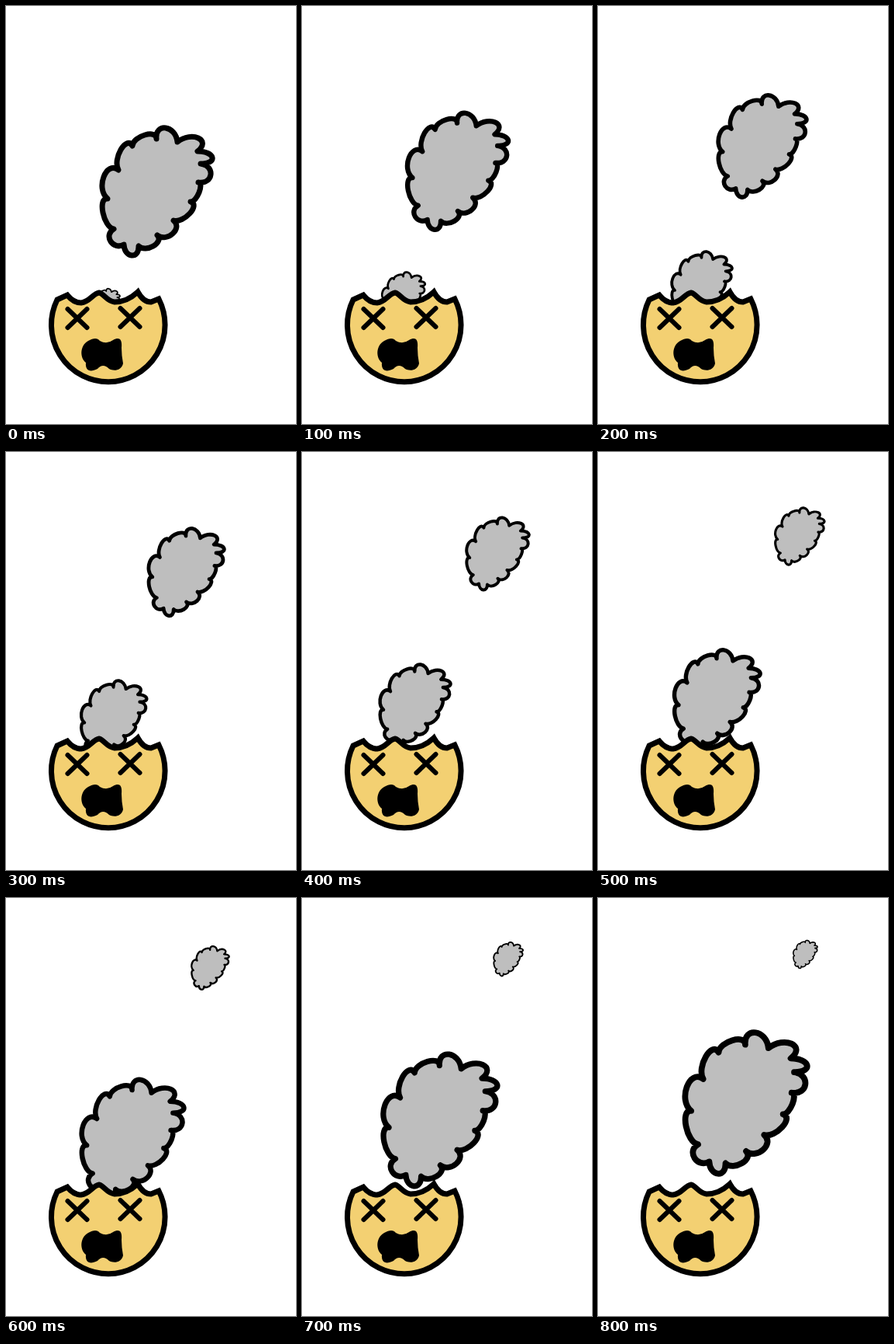
Recreate the animation shown at these times as an HTML page. Size 374x538 px, loop 0.9 s.

```html
<!DOCTYPE html>
<html lang="en">
<head>
<meta charset="utf-8">
<title>Smoking head</title>
<style>
  html, body { margin: 0; width: 100%; height: 100%; overflow: hidden; background: #fff; }
  svg { display: block; width: 100%; height: 100%; }
</style>
</head>
<body>
<svg viewBox="0 0 374 538" stroke="#000" stroke-linecap="round">
  <defs>
    <path id="puff" fill="#bebebe" stroke-width="7" stroke-linejoin="round" transform="translate(-195 -239)"/>
    <path id="eye" fill="none" stroke-width="6" d="M-12.5 -12L12.5 12M12.5 -12L-12.5 12"/>
  </defs>
  <use class="cloud" href="#puff"/>
  <use class="cloud" href="#puff"/>
  <path fill="#f3d072" stroke-width="7"
    d="M66 378L79 372Q87 382 97 382C108 381 112 370 120 369C126 370 130 380 140 381Q156 381 170 368Q177 381 187 381L197 377
       A73.3 73.3 0 1 1 66 378Z"/>
  <use href="#eye" x="92" y="402"/>
  <use href="#eye" x="160" y="401"/>
  <path stroke="none"
    d="M106 431C113 427 118 427 121 431Q130 436 138 430C147 425 150 430 149 440Q149 450 151 460
       C149 470 138 470 133 467Q125 459 118 467C108 472 102 469 103 459C95 453 95 437 106 431Z"/>
</svg>
<script>
const STEP = 100, STEPS = 9;

// Outline of the puff: notches, each followed by the tip of the bump after it.
const notches = [
  [194, 171, 206, 157], [221, 175, 248, 170], [247, 187, 266, 195], [251, 203, 264, 217], [248, 227, 249, 240],
  [238, 252, 237, 267], [216, 276, 215, 293], [195, 295, 190, 309], [171, 309, 162, 321], [152, 307, 135, 303],
  [139, 287, 125, 266], [131, 248, 126, 220], [145, 211, 148, 185], [163, 180, 179, 166]
];

// A cubic whose two handles are parallel, so that it passes through the tip halfway.
function bump([x, y, tipX, tipY], i) {
  const [nextX, nextY] = notches[(i + 1) % notches.length];
  const dx = (tipX - (x + nextX) / 2) * 4 / 3;
  const dy = (tipY - (y + nextY) / 2) * 4 / 3;
  return `C${x + dx} ${y + dy} ${nextX + dx} ${nextY + dy} ${nextX} ${nextY}`;
}

// Key values, spread evenly over the loop; the fresh puff ends where the drifting one begins.
const fresh = { x: [129.5, 134, 146, 163.5, 191], y: [384, 361, 326, 310, 264], width: [37, 82, 96, 139, 166] };
const drifting = { x: [195, 212, 252.5, 263.5, 267.5], y: [239, 180.5, 131, 90, 72.5], width: [150, 120, 85, 51, 33] };

// Catmull-Rom curve through the key values.
function spline(keys, t) {
  const last = keys.length - 1, i = Math.min(Math.floor(t * last), last - 1), k = t * last - i;
  const at = n => keys[Math.max(0, Math.min(last, n))];
  const [a, b, c, d] = [at(i - 1), at(i), at(i + 1), at(i + 2)];
  return b + k * (c - a + k * (2 * a - 5 * b + 4 * c - d + k * (3 * (b - c) + d - a))) / 2;
}

function place(cloud, { x, y, width }, t) {
  cloud.setAttribute('transform', `translate(${spline(x, t)} ${spline(y, t)}) scale(${spline(width, t) / 150})`);
}

const [upper, lower] = document.querySelectorAll('.cloud');
document.getElementById('puff').setAttribute('d', `M${notches[0].slice(0, 2)}${notches.map(bump).join('')}Z`);

function draw() {
  const t = Math.floor(performance.now() / STEP) % STEPS / (STEPS - 1);
  place(upper, drifting, t);
  place(lower, fresh, t);
  requestAnimationFrame(draw);
}
draw();
</script>
</body>
</html>
```
